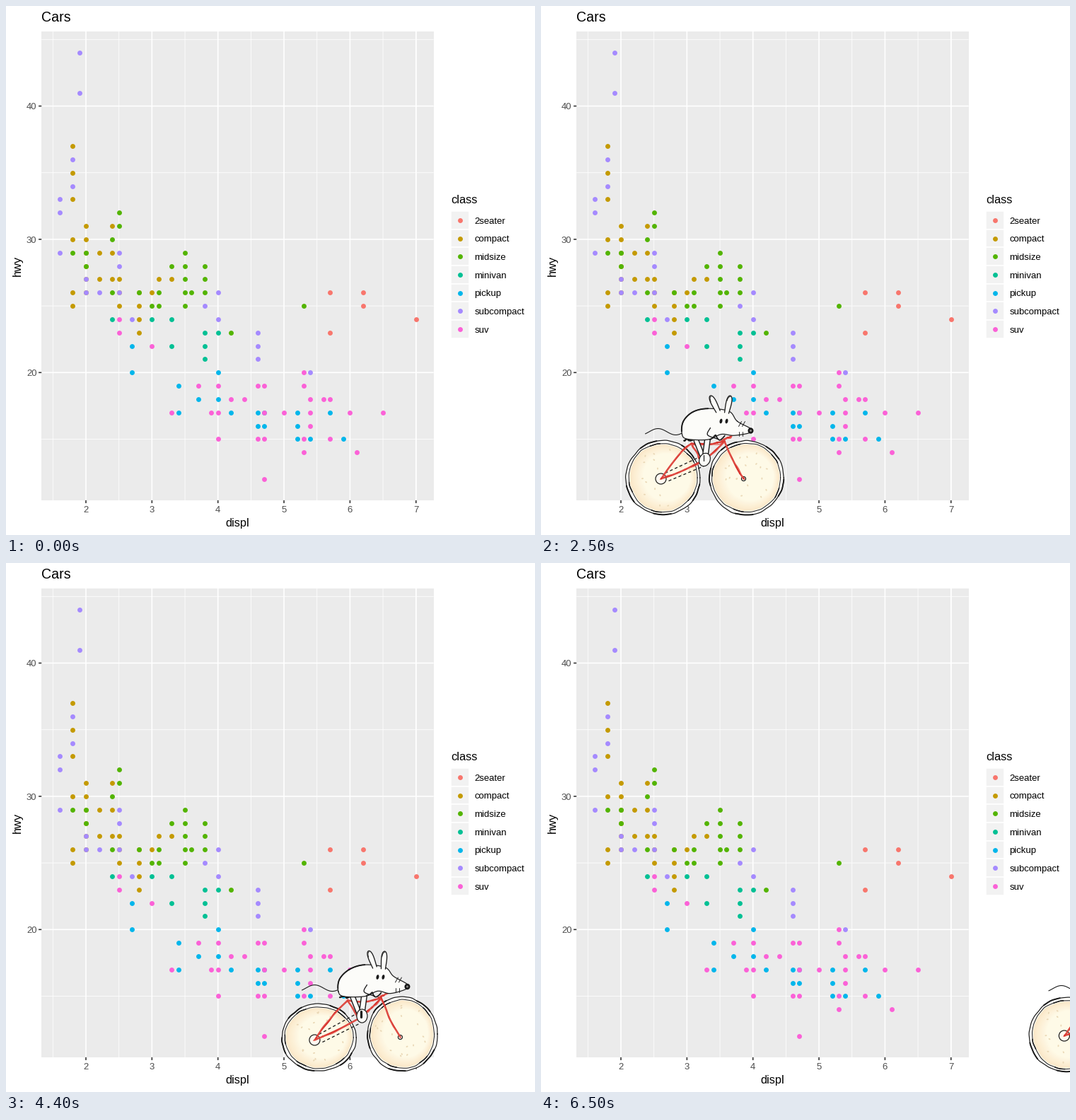
A matplotlib script for the animation above (6.6 s loop, 748 by 748 pixels).

```python
import itertools

import numpy as np
import matplotlib.pyplot as plt
from matplotlib.animation import FuncAnimation
from matplotlib.colors import to_rgb
from matplotlib.patches import Ellipse, Polygon, Rectangle
from matplotlib.transforms import Affine2D

SIZE, FRAMES, STEP, POSES = 748, 66, 14.26, 4
PT = 0.72  # points per pixel at 100 dpi
INK, RED, PALE = "#1a1a1a", "#d6322c", "#fcfcf9"
TAU = 2 * np.pi

plt.rcParams["font.family"] = "Liberation Sans"
fig = plt.figure(figsize=(SIZE / 100, SIZE / 100), dpi=100, facecolor="white")
ax = fig.add_axes([0, 0, 1, 1])
ax.set_xlim(-0.5, SIZE - 0.5)  # whole numbers fall on pixel centres
ax.set_ylim(SIZE - 0.5, -0.5)
ax.set_autoscale_on(False)
ax.axis("off")

# ---------------------------------------------------------------- chart
LEFT, RIGHT, TOP, BOTTOM = 49.7, 604.2, 35.4, 698.4
r = np.r_

# colour, then blocks of dots: every displ crossed with every hwy
CLASSES = {
    "2seater": ("#F8766D", [(5.7, r[23:27:3]), (6.2, r[25:27]), (7, 24)]),
    "compact": ("#C49A00", [
        (1.8, r[25:27, 30, 33:38:2]), (2, r[26:32]), (2.2, r[27:30:2]),
        (2.4, r[27:32:2]), (2.5, r[25:28]), (2.8, r[23:27]), (3, 26),
        (r[3.1, 3.3], 27)]),
    "midsize": ("#53B400", [
        (r[1.8, 2], 29), (2, 28), (2.4, r[26:31:4]), (2.5, r[31:33]),
        (r[2.8, 3.1, 3.6], 26), (r[3, 3.1, 5.3], 25), (3.3, 28),
        (3.5, r[25:30]), (3.8, r[26:29]), (4.2, 23)]),
    "minivan": ("#00C094", [
        (r[2.4, 3, 3.3], 24), (3.3, 22), (3.8, r[21:24]), (4, 23)]),
    "pickup": ("#00B6EB", [
        (2.7, r[20:23:2]), (3.4, r[17:20:2]), (3.7, 18), (4, r[18:21:2]),
        (r[4.6, 4.7], r[16:18]), (5.2, r[15:18]), (r[4.2, 5.7], 17),
        (r[5.4, 5.9], 15)]),
    "subcompact": ("#A58AFF", [
        (1.6, r[29, 32:34]), (1.8, r[34:37:2]), (1.9, r[41:45:3]),
        (r[2, 2.2, 2.5], 26), (2, 27), (2.5, r[28:30]), (2.7, 24), (3.8, 25),
        (4, r[24:27:2]), (4.6, r[21:24]), (5.4, 20)]),
    "suv": ("#FB61D7", [
        (2.5, r[23:25]), (3, 22), (r[4, 4.7], r[15:20:2]), (4.6, r[15:20:4]),
        (4.7, 12), (5.3, r[14:16, 19:21]), (5.4, r[16:19]), (5.7, r[15:19:3]),
        (r[4.2, 4.4, 5.6], 18), (r[3.3, 3.9, 5, 6, 6.5], 17), (3.7, 19),
        (6.1, 14)]),
}


def px(displ):
    return 112.5 + 93.35 * (displ - 2)


def py(hwy):
    return 141 + 18.84 * (40 - hwy)


def rule(xs, ys, color, width):
    ax.plot(xs, ys, color=color, lw=width * PT, zorder=1,
            solid_capstyle="butt", snap=False)


def label(x, y, text, size, color="black", **kw):
    ax.text(x, y, text, fontsize=size * PT, color=color, zorder=4,
            va="baseline", rotation_mode="anchor", **kw)


def dots(xs, ys, color):
    ax.scatter(xs, ys, s=(6.9 * PT) ** 2, color=color, linewidths=0, zorder=3)


def draw_chart():
    ax.add_patch(Rectangle((LEFT, TOP), RIGHT - LEFT, BOTTOM - TOP,
                           fc="#EBEBEB", lw=0, zorder=0))
    for x in np.arange(1.5, 7.5, 0.5):
        rule([px(x)] * 2, [TOP, BOTTOM], "white", 0.8 if x % 1 else 1.6)
    for y in range(15, 50, 5):
        rule([LEFT, RIGHT], [py(y)] * 2, "white", 0.8 if y % 10 else 1.6)
    for x in range(2, 8):
        rule([px(x)] * 2, [TOP, BOTTOM + 4.1], "white", 0.01)
        rule([px(x)] * 2, [BOTTOM, BOTTOM + 4.1], "#333333", 1.6)
        label(px(x), 716, str(x), 13.1, "#4D4D4D", ha="center")
    rule([px(7)] * 2, [TOP, BOTTOM], "white", 1.6)
    for y in (20, 30, 40):
        rule([LEFT - 4.1, LEFT], [py(y)] * 2, "#333333", 1.6)
        label(43, py(y) + 4.8, str(y), 13.1, "#4D4D4D", ha="right")

    label(49.7, 22, "Cars", 19.6)
    label(327, 736, "displ", 16.4, ha="center")
    label(20, 366.6, "hwy", 16.4, ha="center", rotation=90)
    label(628.6, 279, "class", 16.4)
    key = 25.67
    for i, (name, (color, blocks)) in enumerate(CLASSES.items()):
        cy = 302.4 + key * i
        ax.add_patch(Rectangle((641.5 - key / 2, cy - key / 2), key, key,
                               fc="#F2F2F2", ec="white", lw=1.6 * PT, zorder=1))
        dots(641.5, cy, color)
        label(662, cy + 4.7, name, 13.1)
        for displ, hwy in blocks:
            dots(*np.meshgrid(px(displ), py(hwy)), color)


# ---------------------------------------------------------------- cyclist
shift = Affine2D()
moving = shift + ax.transData
order = itertools.count(10)


def smooth(points, closed=False, n=8):
    """Catmull-Rom curve through the points."""
    p = np.asarray(points, float)
    ends = (p[-1:], p[:2]) if closed else (p[:1], p[-1:])
    p = np.vstack([ends[0], p, ends[1]])
    t = np.linspace(0, 1, n)[:, None]
    return np.vstack([
        b + 0.5 * t * (c - a + t * (2 * a - 5 * b + 4 * c - d
                                    + t * (3 * (b - c) + d - a)))
        for a, b, c, d in zip(p, p[1:], p[2:], p[3:])])


class Sketch:
    """Pen, crayon and brush for one hand-drawn pose."""

    def __init__(self, seed):
        self.rng = np.random.default_rng(seed)
        self.parts = []

    def patch(self, p):
        p.set(transform=moving, zorder=next(order))
        self.parts.append(ax.add_patch(p))

    def fill(self, pts, color):
        self.patch(Polygon(pts, fc=color, lw=0))

    def blob(self, x, y, w, h, color, edge="none", angle=0):
        self.patch(Ellipse((x, y), w, h, angle=angle, fc=color, ec=edge,
                           lw=1.2 * PT if edge != "none" else 0))

    def stroke(self, pts, width=1.3, color=INK, **kw):
        self.parts += ax.plot(*np.transpose(pts), color=color, lw=width * PT,
                              transform=moving, zorder=next(order),
                              solid_capstyle="round", **kw)

    def limb(self, a, b, width):
        self.stroke([a, b], width)
        self.stroke([a, b], width - 2.8, PALE)

    def rod(self, a, b, sag=2):
        """Red crayon bar, gone over twice."""
        t = np.linspace(0, 1, 6)[:, None]
        bar = np.array(a) + t * np.subtract(b, a)
        bar[:, 1] += sag * np.sin(np.pi * t[:, 0])
        for width, color, shake in ((2.4, RED, 0.4), (1.2, "#e4574f", 0.9)):
            self.stroke(smooth(bar + self.rng.normal(0, shake, bar.shape)),
                        width, color)

    def scribble(self, x, y, w, h, width):
        t = np.linspace(0, 1, 7)
        zigzag = np.c_[x + w * t, y + h * np.cos(3 * np.pi * t)]
        self.stroke(smooth(zigzag + self.rng.normal(0, 0.6, zigzag.shape)), width)

    def wheel(self, center, radii):
        t = np.linspace(0, TAU, 145)
        center, radii = np.array(center), np.array(radii)

        def ring(inset):
            wobble = 1 + sum(0.03 / n ** 0.6 * np.sin(n * t + self.rng.uniform(0, TAU))
                             for n in (3, 7, 11, 16, 23)) / 2
            return center + np.c_[np.cos(t), np.sin(t)] * (radii - inset) * wobble[:, None]

        outer, inner = ring(1), ring(5)
        self.fill(outer, "#fffefb")
        rim, crumb = np.array(to_rgb("#fbe8c9")), np.array(to_rgb("#fefae7"))
        for f in np.linspace(0, 1, 9):
            mid = center + f * np.array([5, -1])
            self.fill(mid + (inner - center) * (0.97 - 0.27 * f),
                      rim + (crumb - rim) * f)
        for _ in range(18):
            a, d = self.rng.uniform(0, TAU), 41 * np.sqrt(self.rng.random())
            self.blob(center[0] + d * np.cos(a), center[1] + d * np.sin(a),
                      3, 1.9, "#ead8b6", angle=self.rng.uniform(0, 180))
        self.stroke(inner, 1.0)
        self.stroke(outer, 1.2)
        for k in range(0, 140, 28):
            k += self.rng.integers(0, 12)
            self.stroke(outer[k:k + 12], 1.9)
            self.stroke(inner[k + 6:k + 14], 1.5)

    def ear(self, x, y, lean):
        t = np.linspace(0, np.pi, 25)
        along = 25 * np.sin(t) ** 0.8
        side = -6 * np.cos(t) * (0.5 + 0.5 * np.sin(t))
        c, s = np.cos(lean), np.sin(lean)
        curve = np.c_[x + along * s + side * c, y - along * c + side * s]
        self.fill(curve, PALE)
        self.stroke(curve, 1.3)
        self.stroke(curve[8:16] * 0.6 + curve[2:10] * 0.4, 0.8)


def draw_pose(k):
    s = Sketch(k + 3)
    sway, dip = np.sin(TAU * k / POSES), max(0, np.cos(TAU * k / POSES))
    lift = 1.5 * (sway - 1)
    hub = np.array([167 + 2 * sway - 2 * dip, 668 + 6 * dip])
    axle = np.array([286, 670 - 2 * sway])
    seat, crank, bars = (212, 618), (227, 643), (259, 615)

    s.wheel((172 - dip, 666.5 + 4 * dip), (53.5, 53.5 - 5 * dip))
    s.wheel((290 - dip, 666.5 - dip), (53.5 - 3 * dip, 53.5))
    s.blob(*hub, 15, 15, "#fffaf0", INK)
    s.blob(*axle, 6, 6, "#fffaf0", INK)

    # chain and frame
    for start, end in ((hub + (6, -8), (222, 638)), (hub + (11, 3), (230, 650))):
        s.stroke([start, end], 1.3, dashes=(3.2, 2.6))
    for a, b, sag in ((hub, seat, -4), (hub, crank, 2), (seat, crank, 0),
                      (seat, bars, 3), (crank, bars, 2), (bars, axle, 5)):
        s.rod(a, b, sag)
    s.rod((255, 614), (268, 608), 0)

    # tail, legs, saddle
    x = np.linspace(147, 200, 24)
    s.stroke(np.c_[x, 601.5 + 0.6 * lift + 4.5 * np.cos(TAU * (x - 190) / 50)], 1.1)
    foot = (231 + dip, 641 - dip)
    s.limb((219, 614), (227, 634), 8)
    s.limb((235, 612), (232, 634), 9)
    s.blob(*foot, 15, 19, PALE, INK, angle=25 * (1 - dip))
    s.stroke([np.add(foot, (-1, -6)), np.add(foot, (-1, 2))], 1.2 + 2 * dip)
    s.scribble(202, 613, 13, 1, 2.4)

    # body, then head details
    body = np.array([(199, 606), (200, 588), (214, 574), (236, 569 + lift),
                     (265, 573 + lift), (277, 586 + lift), (296, 597 + lift),
                     (295, 603 + lift), (272, 607), (254, 605), (236, 612),
                     (207, 612)])
    curve = smooth(body + s.rng.normal(0, 0.4, body.shape), closed=True)
    s.fill(curve, PALE)
    s.stroke(curve, 1.2)
    s.stroke(curve[2:24], 1.9)
    s.ear(250, 573 + lift, -0.36 - 0.1 * sway)
    s.ear(262, 575 + lift, 0.08 + 0.13 * sway)
    for x in (254, 262):
        s.blob(x, 586.5 + lift, 3.8, 6.8, INK, angle=12)
    for x in (279, 284):
        s.stroke([(x, 594 + lift), (x + 4, 587 + lift)], 0.9)
        s.stroke([(x + 1, 602 + lift), (x + 1, 608 + lift)], 0.9)
    s.blob(296, 600 + lift, 8, 8.4, INK)
    s.blob(296, 600 + lift, 3, 3, "#8a8a86")

    # arms on the handlebar
    s.stroke(smooth([(239, 596), (235, 606), (250, 612)]), 1.3)
    s.scribble(239, 610, 20, 3, 1.7)
    return s.parts


draw_chart()
poses = [draw_pose(k) for k in range(POSES)]


def update(i):
    shift.clear().translate(STEP * (i - 25), 0)
    for k, parts in enumerate(poses):
        for part in parts:
            part.set_visible(k == i % POSES)
    return []


anim = FuncAnimation(fig, update, frames=FRAMES, interval=100, repeat=True,
                     repeat_delay=0, blit=False)
plt.show()
```
